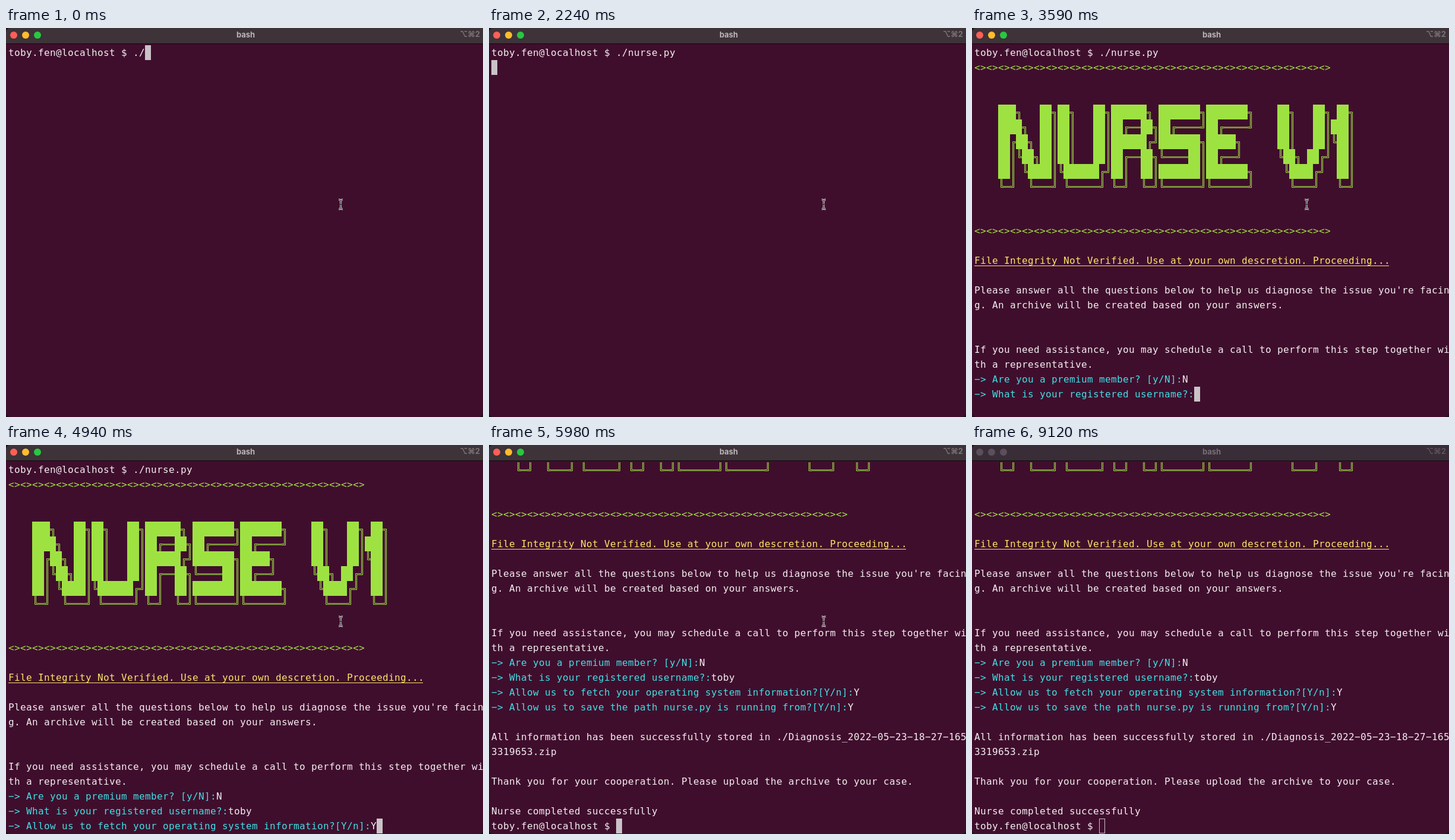
Animation, 803 px wide and 655 px high, one loop 9.22 s. Source, as an HTML page with a canvas:

```html
<!DOCTYPE html>
<html lang="en">
<head>
<meta charset="utf-8">
<title>bash</title>
<style>
  html, body { margin: 0; width: 100%; height: 100%; overflow: hidden; background: #161316; }
  canvas { display: block; }
</style>
</head>
<body>
<canvas id="stage" width="803" height="655"></canvas>
<script>
const ctx = document.getElementById('stage').getContext('2d');
const LOOP = 9220, COLS = 80, ROWS = 25, CELL_W = 10, CELL_H = 25, LEFT = 4, TOP = 29;
const WHITE = '#f3eff1', GREEN = '#9ee242', OLIVE = '#789237', YELLOW = '#fce566',
      CYAN = '#3fe0e5', CURSOR = '#c9c3c7';
const BLUR_AT = 9120;

const PROMPT = 'toby.fen@localhost $ ';
const RULE = '<>'.repeat(30);
const BANNER = `
    ███╗   ██╗██╗   ██╗██████╗ ███████╗███████╗    ██╗   ██╗ ██╗
    ████╗  ██║██║   ██║██╔══██╗██╔════╝██╔════╝    ██║   ██║███║
    ██╔██╗ ██║██║   ██║██████╔╝███████╗█████╗      ██║   ██║╚██║
    ██║╚██╗██║██║   ██║██╔══██╗╚════██║██╔══╝      ╚██╗ ██╔╝ ██║
    ██║ ╚████║╚██████╔╝██║  ██║███████║███████╗     ╚████╔╝  ██║
    ╚═╝  ╚═══╝ ╚═════╝ ╚═╝  ╚═╝╚══════╝╚══════╝      ╚═══╝   ╚═╝
`;
const INTRO = `${RULE}

${BANNER}

${RULE}

File Integrity Not Verified. Use at your own descretion. Proceeding...

Please answer all the questions below to help us diagnose the issue you're facing. An archive will be created based on your answers.


If you need assistance, you may schedule a call to perform this step together with a representative.
-> Are you a premium member? [y/N]:N`;
const OUTRO = `

All information has been successfully stored in ./Diagnosis_2022-05-23-18-27-1653319653.zip

Thank you for your cooperation. Please upload the archive to your case.

Nurse completed successfully
${PROMPT}`;

// Terminal output as [time in ms, appended text]
const OUTPUT = [
  [0, PROMPT + './'], [750, 'n'], [900, 'u'], [1190, 'r'], [1490, 's'],
  [1640, 'e.'], [1940, 'py'], [2240, '\n'], [2540, INTRO],
  [3590, '\n-> What is your registered username?:'],
  [4490, 't'], [4640, 'ob'], [4790, 'y'],
  [4940, '\n-> Allow us to fetch your operating system information?[Y/n]:Y'],
  [5530, '\n-> Allow us to save the path nurse.py is running from?[Y/n]:Y'],
  [5980, OUTRO],
];

// Directions in which the arms of each corner point
const CORNERS = { '╔': [1, 1], '╗': [-1, 1], '╚': [1, -1], '╝': [-1, -1] };

function rect(x, y, w, h, color) {
  ctx.fillStyle = color;
  ctx.fillRect(x, y, w, h);
}

function drawCorner(x, y, [dx, dy]) {
  ctx.strokeStyle = GREEN;
  ctx.lineWidth = 1;
  ctx.beginPath();
  for (const side of [-1, 1]) {
    const cx = x + 5.5 + side * dx, cy = y + 13.5 + side * dy;
    ctx.moveTo(dx < 0 ? x : x + CELL_W, cy);
    ctx.lineTo(cx, cy);
    ctx.lineTo(cx, dy < 0 ? y : y + CELL_H);
  }
  ctx.stroke();
}

function drawChar(char, x, y, color) {
  if (char === ' ') return;
  if (char === '█') rect(x, y, CELL_W, CELL_H, GREEN);
  else if (char === '═') rect(x, y + 12, CELL_W, 3, OLIVE);
  else if (char === '║') for (const dx of [4, 6]) rect(x + dx, y, 1, CELL_H, GREEN);
  else if (CORNERS[char]) drawCorner(x, y, CORNERS[char]);
  else {
    ctx.fillStyle = color;
    ctx.fillText(char === '-' ? '−' : char, x, y + 18); // the terminal font has wide hyphens
  }
}

function drawLine(line, y) {
  const isQuestion = line.startsWith('->'), isWarning = line.startsWith('File');
  const answerAt = line.indexOf(':') + 1;
  const base = isWarning ? YELLOW : line.startsWith('<>') ? GREEN : WHITE;
  [...line].forEach((char, col) =>
    drawChar(char, LEFT + col * CELL_W, y, isQuestion && col < answerAt ? CYAN : base));
  if (isWarning) rect(LEFT, y + 21, line.length * CELL_W - 2, 1, YELLOW);
}

function drawTerminal(time, focused) {
  const text = OUTPUT.filter(([at]) => at <= time).map(([, added]) => added).join('');
  const lines = text.split('\n').flatMap(line => line.match(/.{1,80}/g) || ['']);
  const visible = lines.slice(-ROWS);
  ctx.font = '16px "DejaVu Sans Mono", monospace';
  ctx.textAlign = 'left';
  visible.forEach((line, row) => drawLine(line, TOP + row * CELL_H));

  const x = LEFT + visible.at(-1).length * CELL_W;
  const y = TOP + (visible.length - 1) * CELL_H;
  if (focused) return rect(x, y, CELL_W, CELL_H, CURSOR);
  ctx.strokeStyle = CURSOR;
  ctx.lineWidth = 1;
  ctx.strokeRect(x + 0.5, y + 0.5, CELL_W - 1, CELL_H - 1);
}

function drawWindow(focused) {
  rect(0, 0, 803, 655, '#161316');
  ctx.save();
  ctx.beginPath();
  ctx.roundRect(0, 0, 803, 655, [7, 0, 8, 8]);
  ctx.clip();
  rect(0, 0, 803, 655, '#400e2d');
  rect(0, 0, 803, 26, focused ? '#3d3338' : '#392d38');
  rect(0, 26, 803, 1, '#12070e');
  ctx.restore();

  ['#ff5f57', '#febc2e', '#28c840'].forEach((color, i) => {
    ctx.fillStyle = focused ? color : '#5c4f5b';
    ctx.beginPath();
    ctx.arc(13 + 20 * i, 12, 6, 0, 7);
    ctx.fill();
  });
  ctx.font = 'bold 13px Inter, "DejaVu Sans", sans-serif';
  ctx.textAlign = 'center';
  ctx.fillStyle = focused ? '#bbb5b8' : '#796e78';
  ctx.fillText('bash', 403.5, 16);
  ctx.textAlign = 'right';
  ctx.fillStyle = focused ? '#7d7478' : '#5f545e';
  ctx.fillText('⌥⌘2', 798, 15);
}

function drawPointer(x, y) {
  const beam = new Path2D('M-3.5-8Q0-8 0-5.5Q0-8 3.5-8M0-5.5V5.5M-3.5 8Q0 8 0 5.5Q0 8 3.5 8M-1.5 0H1.5');
  ctx.save();
  ctx.translate(x, y);
  for (const [color, width] of [['#e8e4e6', 2.8], ['#0c0409', 1]]) {
    ctx.strokeStyle = color;
    ctx.lineWidth = width;
    ctx.stroke(beam);
  }
  ctx.restore();
}

function render(now) {
  const time = now % LOOP, focused = time < BLUR_AT;
  drawWindow(focused);
  drawTerminal(time, focused);
  if (time < 7930) drawPointer(563.5, 297);
  else if (time < 8080) drawPointer(638.5, 308);
}

const start = performance.now();
function tick() {
  render(performance.now() - start);
  requestAnimationFrame(tick);
}
tick();
</script>
</body>
</html>
```
